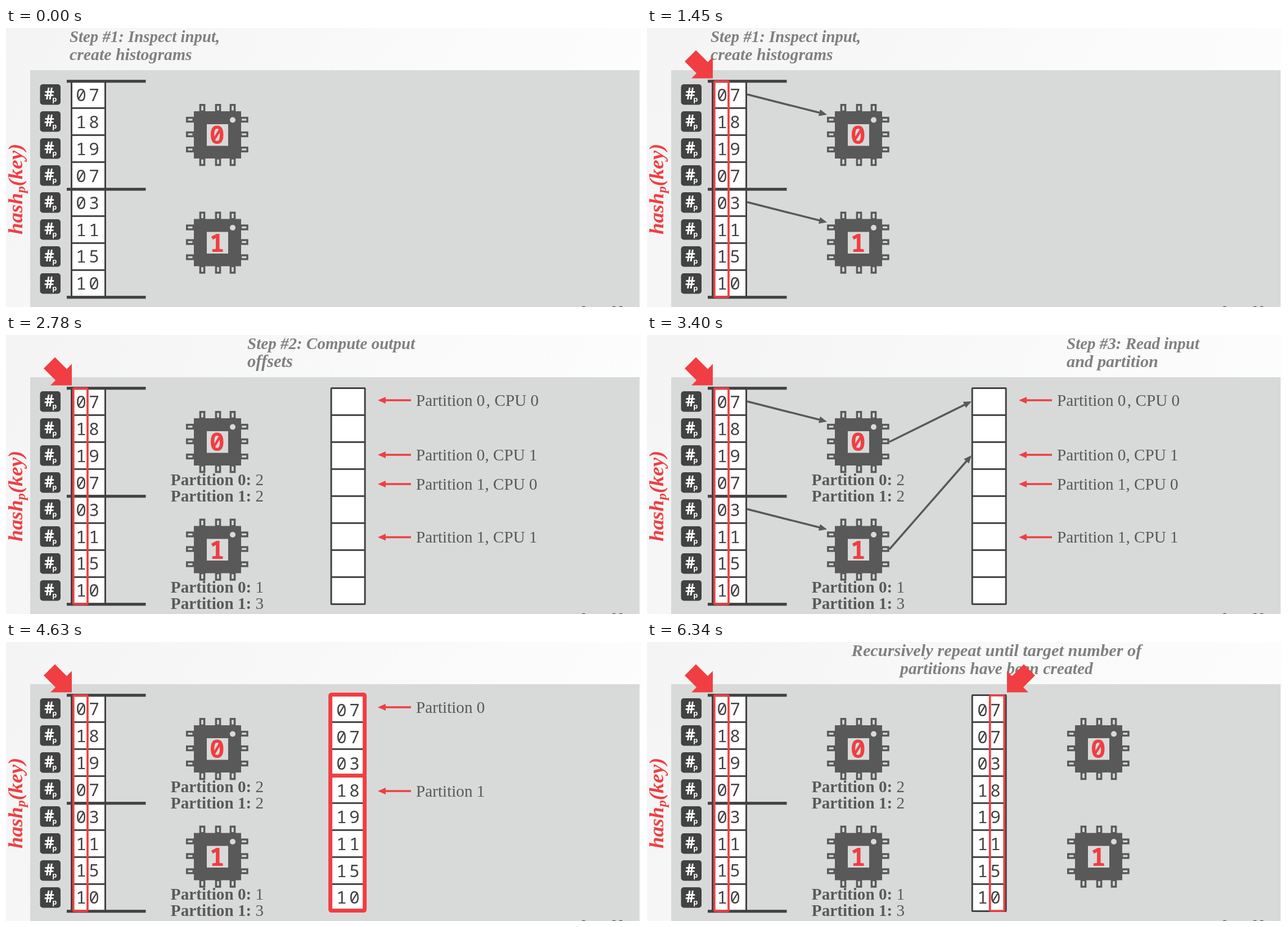
An HTML page that plays this animation: 1129 by 496 pixels, repeating every 7670 ms.

```html
<!DOCTYPE html>
<html lang="en">
<head>
<meta charset="utf-8">
<title>Radix partitioning</title>
<style>
html, body { margin: 0; width: 100%; height: 100%; overflow: hidden; background: #f8f8f8; }
svg { display: block; width: 100%; height: 100%; }
text { white-space: pre; }
.serif { font-family: "Liberation Serif", "Noto Serif", serif; }
.mono { font-family: "Noto Sans Mono", "DejaVu Sans Mono", monospace; }
.title { font-weight: bold; font-style: italic; fill: #808080; }
.digits { font-size: 31px; letter-spacing: 4.4px; fill: #424242; }
.label { font-size: 29.2px; fill: #595959; }
</style>
</head>
<body>
<svg id="stage" viewBox="0 0 1129 496">
  <defs>
    <linearGradient id="paper" x1="0" y1="0" x2="1" y2="0.25">
      <stop offset="0" stop-color="#f4f4f4"/>
      <stop offset="1" stop-color="#fdfdfd"/>
    </linearGradient>
  </defs>
</svg>
<script>
const LOOP = 7670;
const RED = '#f03e42', DARK = '#424242', CHIP = '#595959', PANEL = '#d8dad9';
const ROW = 48, TOP = 94.4, ROWS = 8;
const input = ['07', '18', '19', '07', '03', '11', '15', '10'];
const output = ['07', '07', '03', '18', '19', '11', '15', '10'];
const stage = document.getElementById('stage');
const scenes = [];

function add(parent, tag, attrs, text) {
  const el = document.createElementNS('http://www.w3.org/2000/svg', tag);
  for (const key in attrs) el.setAttribute(key, attrs[key]);
  if (text !== undefined) el.textContent = text;
  parent.appendChild(el);
  return el;
}

const rect = (g, x, y, width, height, fill, more) =>
  add(g, 'rect', { x, y, width, height, fill, ...more });

const frame = (g, x, y, width, height, stroke, weight, rx = 0) =>
  rect(g, x, y, width, height, 'none', { stroke, 'stroke-width': weight, rx });

const text = (g, x, y, cls, str, more) => add(g, 'text', { x, y, class: cls, ...more }, str);

// A group visible from start to end
function scene(start, end = LOOP) {
  const g = add(stage, 'g', {});
  scenes.push({ g, start, end });
  return g;
}

function title(g, x, lines, sizes, anchor = 'start') {
  lines.forEach((line, i) => text(g, x, 25 + i * 31.5, 'serif title', line,
    { 'font-size': sizes[i], 'text-anchor': anchor }));
}

function table(g, x) {
  rect(g, x, TOP, 60, ROW * ROWS, '#fff');
  for (let i = 1; i < ROWS; i++) rect(g, x, TOP + i * ROW - 1.5, 60, 3, DARK);
  frame(g, x, TOP, 60, ROW * ROWS, DARK, 3, 1);
}

function digits(g, x, y, step, values) {
  values.forEach((v, i) => text(g, x, y + i * step, 'mono digits', v));
}

function arrow(g, x1, y1, x2, y2, color) {
  const len = Math.hypot(x2 - x1, y2 - y1);
  const turn = Math.atan2(y2 - y1, x2 - x1) * 180 / Math.PI;
  add(g, 'path', {
    d: `M0-1.8H${len - 14}V-6L${len} 0L${len - 14} 6V1.8H0Z`,
    fill: color, transform: `translate(${x1} ${y1}) rotate(${turn})`
  });
}

function pointer(g, x, flip) {
  add(g, 'path', {
    d: 'M0 0V-38L-9-29L-30-50L-50-30L-29-9L-38 0Z',
    fill: RED, transform: `translate(${x} 89.5) scale(${flip} 1)`
  });
}

function chip(parent, x, y, id) {
  const g = add(parent, 'g', { transform: `translate(${x} ${y})` });
  for (const p of [29, 57, 83]) {
    for (const edge of [1.75, 97]) frame(g, p - 3.6, edge, 7.2, 11.5, CHIP, 3.5);
  }
  for (const p of [28, 54, 81]) {
    for (const edge of [1.75, 97.5]) frame(g, edge, p - 3.4, 11.5, 6.8, CHIP, 3.5);
  }
  rect(g, 14, 13, 84, 84, CHIP);
  rect(g, 37, 36, 38, 38.5, PANEL);
  add(g, 'circle', { cx: 83, cy: 28.5, r: 5, fill: PANEL });
  text(g, 55.3, 71, 'mono', id, {
    'font-size': 45, 'font-weight': 'bold', fill: RED, 'text-anchor': 'middle'
  });
}

function chips(g, x) {
  chip(g, x, 135, 0);
  chip(g, x, 326.5, 1);
}

function count(g, y, part, n) {
  const t = text(g, 375.5, y, 'serif label', '', { 'text-anchor': 'middle' });
  add(t, 'tspan', { 'font-weight': 'bold' }, `Partition ${part}:`);
  add(t, 'tspan', {}, ` ${n}`);
}

function offset(g, y, label) {
  arrow(g, 720, y, 661, y, RED);
  text(g, 729, y + 9.5, 'serif label', label);
}

// Always visible
const base = scene(0);
rect(base, 0, 0, 1129, 496, 'url(#paper)');
rect(base, 43, 75, 1083.5, 421, PANEL);
for (const cx of [1027, 1081, 1093]) {
  add(base, 'ellipse', { cx, cy: 496.5, rx: 3.5, ry: 2, fill: CHIP });
}
for (let i = 0; i < ROWS; i++) {
  const y = 100 + i * ROW;
  rect(base, 60.5, y, 36.5, 36.5, DARK, { rx: 5 });
  text(base, 77, y + 27, 'mono', '#', {
    'font-size': 29, 'font-weight': 'bold', fill: '#fff', 'text-anchor': 'middle'
  });
  text(base, 86.5, y + 31, 'mono', 'p', {
    'font-size': 13, 'font-weight': 'bold', fill: '#fff', 'text-anchor': 'middle'
  });
}
table(base, 116.5);
for (const i of [0, 4, 8]) rect(base, 108, TOP + i * ROW - 2.3, 140.5, 5.2, DARK);
digits(base, 124.2, 130, 47.9, input);
chips(base, 320);

const hash = text(base, 0, 0, 'serif', '', {
  transform: 'translate(29 367) rotate(-90)', 'font-size': 36.8,
  'font-weight': 'bold', 'font-style': 'italic', fill: RED
});
add(hash, 'tspan', {}, 'hash');
add(hash, 'tspan', { 'font-size': 24, dy: 5 }, 'p');
add(hash, 'tspan', { dy: -5 }, '(key)');

// Step titles
title(scene(0, 2780), 113, ['Step #1: Inspect input,', 'create histograms'], [28.8, 29.8]);
title(scene(2780, 3400), 429, ['Step #2: Compute output', 'offsets'], [29.1, 30.6]);
title(scene(3400, 4630), 746, ['Step #3: Read input', 'and partition'], [29, 30.4]);
title(scene(5560), 621.5,
  ['Recursively repeat until target number of', 'partitions have been created'],
  [30.4, 29.6], 'middle');

// First digit
const firstDigit = scene(750);
pointer(firstDigit, 117, 1);
frame(firstDigit, 119.8, 94.8, 25.2, 383.5, RED, 3.7, 2);

// Input flowing into the chips
for (const [start, end] of [[1450, 2150], [3400, 3940]]) {
  const g = scene(start, end);
  arrow(g, 178, 118, 320, 154, CHIP);
  arrow(g, 178, 309.5, 320, 345.5, CHIP);
}

const counts = scene(2150);
count(counts, 267, 0, 2);
count(counts, 296, 1, 2);
count(counts, 458, 0, 1);
count(counts, 487, 1, 3);

// Output table
table(scene(2780), 578.2);
const writes = scene(3400, 3940);
arrow(writes, 431, 190, 577, 118, CHIP);
arrow(writes, 431, 381, 577, 214, CHIP);
digits(scene(3940), 587.2, 132, 47.6, output);

const offsets = scene(2780, 4630);
offset(offsets, 116, 'Partition 0\u200a, CPU 0');
offset(offsets, 213, 'Partition 0, CPU 1');
offset(offsets, 265, 'Partition 1, CPU 0');
offset(offsets, 359.5, 'Partition 1, CPU 1');

const parts = scene(4630, 6340);
offset(parts, 116, 'Partition 0');
offset(parts, 265, 'Partition 1');
frame(parts, 576.7, 93.5, 61, 144, RED, 7, 2);
frame(parts, 576.7, 237.5, 61, 240, RED, 7, 2);

// Second digit
const secondDigit = scene(6340);
chips(secondDigit, 747);
frame(secondDigit, 609.7, 95, 25.5, 383, RED, 3.7, 2);
pointer(secondDigit, 640, -1);

function render(t) {
  for (const { g, start, end } of scenes) {
    g.setAttribute('display', t >= start && t < end ? 'inline' : 'none');
  }
}

const began = performance.now();
function tick() {
  render((performance.now() - began) % LOOP);
  requestAnimationFrame(tick);
}
tick();
</script>
</body>
</html>
```
